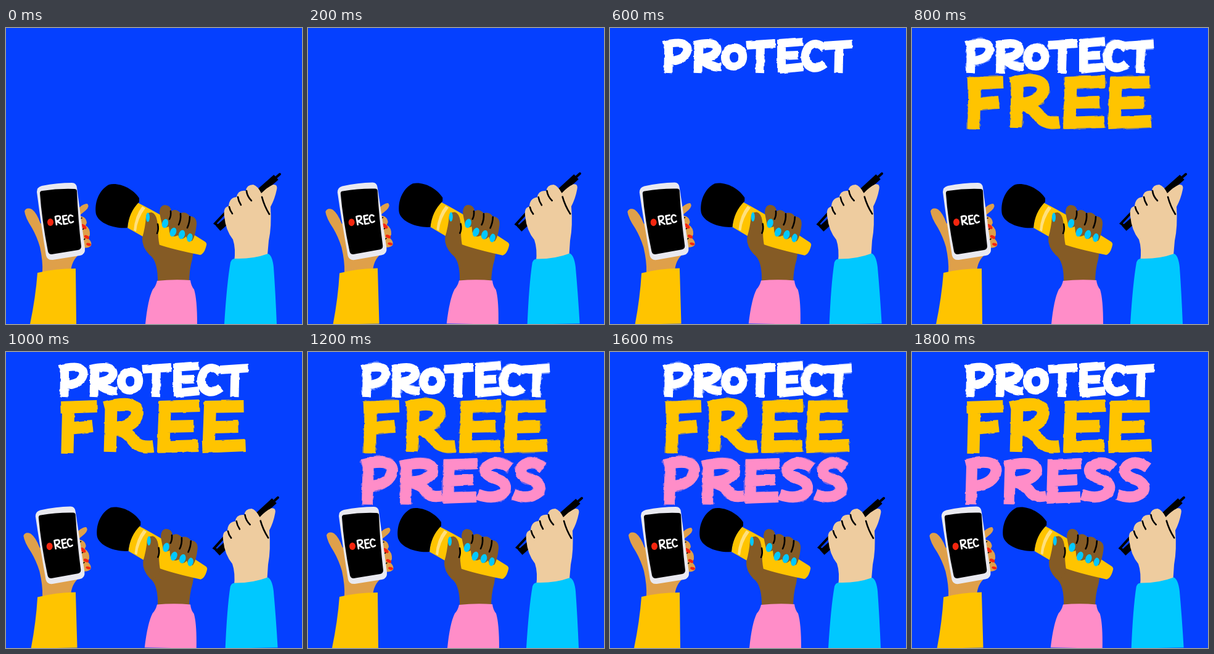
An HTML page for the animation above (2000 ms loop, 480 by 480 pixels).

```html
<!DOCTYPE html>
<html lang="en">
<head>
<meta charset="utf-8">
<title>Protect free press</title>
<style>
  html, body { margin: 0; width: 100%; height: 100%; overflow: hidden; background: #0540ff; }
  svg { display: block; width: 100vw; height: 100vh; }
  .line { fill: none; stroke: #000; stroke-width: 2.6; stroke-linecap: round; }
  .word { fill: none; stroke-linejoin: round; }
  .tan { fill: #dfa04a; }
  .brown { fill: #855b25; }
  .peach { fill: #eecc9f; }
  .nail { fill: #00c8ff; }
  .red { fill: #f5260f; }
</style>
</head>
<body>
<svg viewBox="0 0 480 480">
  <defs>
    <filter id="brush0" color-interpolation-filters="sRGB">
      <feTurbulence type="fractalNoise" baseFrequency=".03 .12" numOctaves="2" seed="4" result="noise"/>
      <feDisplacementMap in="SourceGraphic" in2="noise" scale="3" xChannelSelector="R" yChannelSelector="G" result="paint"/>
      <feDisplacementMap in="SourceGraphic" in2="noise" scale="9" xChannelSelector="B" yChannelSelector="R"/>
      <feComponentTransfer result="fringe"><feFuncA type="linear" slope=".45"/></feComponentTransfer>
      <feMerge><feMergeNode in="fringe"/><feMergeNode in="paint"/></feMerge>
    </filter>
    <filter id="brush1" color-interpolation-filters="sRGB">
      <feTurbulence type="fractalNoise" baseFrequency=".05 .1" numOctaves="2" seed="9" result="noise"/>
      <feDisplacementMap in="SourceGraphic" in2="noise" scale="3" xChannelSelector="R" yChannelSelector="G"/>
    </filter>
  </defs>

  <g id="lettering">
    <g class="word" data-start="2" role="img" aria-label="PROTECT" stroke="#fff" stroke-width="14">
      <path d="M96 21L95 73M87 28Q127 18 126 36Q123 51 99 53
        M144 22L143 73M137 28Q175 19 174 36Q170 47 148 49Q158 63 181 63
        M202 32C220 32 220 62 201 62S183 32 202 32Z
        M221 28L268 25M244 27L243 73
        M278 19V72M274 25L313 22M280 45L305 44M274 67L313 63
        M348 34Q333 19 321 32Q312 47 321 60Q332 70 348 58
        M347 29L392 26M371 27L370 73"/>
    </g>
    <g class="word" data-start="4" role="img" aria-label="FREE" stroke="#ffc400" stroke-width="20">
      <path d="M102 82L100 164M90 90L148 88M103 124L141 120
        M171 84L169 162M160 90Q214 76 213 100Q209 120 178 123Q198 130 207 144Q216 156 239 153
        M258 80L255 163M250 89L313 87M260 121L304 120M246 154L312 152
        M331 81L328 161M322 89L385 88M334 122L376 121M318 154L388 151"/>
    </g>
    <g class="word" data-start="6" role="img" aria-label="PRESS" stroke="#ff8dc8" stroke-width="18">
      <path d="M98 174L96 247M88 183Q137 171 137 193Q133 214 100 218
        M160 177L158 247M150 185Q205 173 202 194Q197 209 164 211Q186 216 192 227Q199 237 218 233
        M229 174L227 244M221 183L275 181M230 209L268 207M219 237L273 235
        M327 188Q306 173 290 186Q282 198 303 205Q326 212 318 227Q303 241 275 231
        M382 188Q362 173 348 185Q338 198 360 206Q381 213 374 227Q358 241 333 231"/>
    </g>
  </g>

  <g data-pivot="80 392" data-tilt="-1">
    <path class="tan" d="M30 297Q33 290 42 294Q50 300 56 317L110 300Q124 284 132 285Q136 290 129 296L118 305
      Q130 305 131 316L129 320Q137 325 136 336L133 341Q140 347 138 353Q132 359 121 355
      L119 367Q106 377 105 396H59Q60 378 55 355Q50 338 42 324Q31 307 30 297Z"/>
    <path class="line" style="stroke-width:1.6" d="M119 310L123 308M121 328L127 325M123 345L128 342"/>
    <g class="red">
      <ellipse cx="126" cy="322" rx="5.5" ry="3" transform="rotate(40 126 322)"/>
      <ellipse cx="131" cy="339" rx="4.5" ry="2.5" transform="rotate(25 131 339)"/>
      <ellipse cx="134" cy="351" rx="4" ry="2.2" transform="rotate(15 134 351)"/>
    </g>
    <path fill="#e9e9f0" d="M58 256Q83 251 107 251Q114 251 115 259L128 357Q129 367 120 369L76 376Q67 377 65 369Q57 320 50 266Q50 258 58 256Z"/>
    <path d="M59 264Q85 260 111 261Q115 261 115 265Q117 312 122 354Q122 359 117 360L74 367Q69 367 68 362Q58 311 55 268Q55 264 59 264Z"/>
    <ellipse class="red" cx="72" cy="315" rx="5" ry="6"/>
    <path role="img" aria-label="REC" fill="none" stroke="#fff" stroke-width="2.7" stroke-linecap="round" stroke-linejoin="round"
      d="M82 319L80 306Q88 303 88 308Q88 312 82 313L90 318M98 304L92 305L94 318L100 317M93 311L98 310M108 305Q102 301 101 309Q103 319 109 314"/>
    <path fill="#ffc400" d="M39 480Q48 437 51 397Q80 390 113 390L114 480Z"/>
  </g>

  <g data-pivot="270 410" data-tilt="1">
    <path class="brown" d="M222 340Q222 357 233 368Q247 378 246 415H297Q297 392 302 375Q307 350 300 330L240 325Z"/>
    <path fill="#ffc400" d="M213 283Q255 304 322 346Q327 348 324 356Q321 366 315 368Q270 359 247 351Q222 339 197 324Q199 299 213 283Z"/>
    <path d="M221 289Q209 304 207 328L211 330Q213 309 226 292Z" fill="#ffe07c"/>
    <path d="M216 276C205 259 182 250 167 254C150 263 143 284 146 302C151 318 178 326 197 324Q199 299 216 282Z"/>
    <path class="brown" d="M249 300Q249 288 257 287Q267 287 268 297Q275 292 283 300Q292 297 298 305Q310 306 309 319Q307 338 302 345Q295 347 292 338Q283 347 279 336Q269 342 265 331L264 322Q256 326 253 319Z"/>
    <path class="line" d="M267 297Q268 304 265 310M283 301Q284 311 280 319M298 306Q298 315 294 324"/>
    <g class="nail">
      <ellipse cx="258" cy="317" rx="5" ry="7.5" transform="rotate(15 258 317)"/>
      <ellipse cx="271" cy="331" rx="5" ry="7.5" transform="rotate(22 271 331)"/>
      <ellipse cx="285" cy="335" rx="5" ry="7.5" transform="rotate(16 285 335)"/>
      <ellipse cx="298" cy="340" rx="4.5" ry="7" transform="rotate(12 298 340)"/>
    </g>
    <path class="brown" d="M227 306Q228 299 236 299Q243 301 245 312L247 325Q246 338 249 353Q244 371 233 368Q220 355 221 340Q226 323 227 306Z"/>
    <path class="line" d="M246 318Q248 327 245 333"/>
    <ellipse class="nail" cx="230" cy="307" rx="3" ry="7.5"/>
    <path fill="#ff8dc8" d="M226 480Q230 440 238 424Q243 419 245 410Q272 407 299 409Q300 418 305 424Q310 440 310 480Z"/>
  </g>

  <g data-pivot="395 395" data-tilt="-1.1">
    <path fill="none" stroke="#000" stroke-width="11" d="M344 325L438 242"/>
    <path fill="none" stroke="#000" stroke-width="4" stroke-linecap="round" d="M436 244L444 237M343 320L339 317L355 300"/>
    <path class="peach" d="M354 305Q352 290 361 289Q362 275 374 274Q376 262 389 264Q390 254 401 254Q408 256 414 268
      Q424 258 433 254Q441 253 439 262Q436 277 429 290Q431 322 426 345L423 380H370Q373 358 368 343Q356 328 354 305Z"/>
    <path class="line" d="M362 290Q363 296 367 301M376 274Q377 281 381 287M390 264Q391 273 398 280M415 274Q419 289 427 302"/>
    <path fill="#00c8ff" d="M354 480Q358 415 364 380Q366 374 371 374Q400 375 425 366Q432 369 434 388Q437 430 439 480Z"/>
  </g>
</svg>
<script>
  const STEP = 200, STEPS = 10;
  const lettering = document.getElementById('lettering');
  const words = document.querySelectorAll('.word');
  const arms = document.querySelectorAll('[data-pivot]');

  function draw(now) {
    const step = Math.floor(now / STEP) % STEPS;
    const pose = step % 2;
    lettering.setAttribute('transform', pose ? 'translate(-1 0) scale(1.004 1)' : '');
    for (const word of words) {
      word.style.display = step >= +word.dataset.start ? '' : 'none';
      word.setAttribute('filter', `url(#brush${pose})`);
    }
    for (const arm of arms) {
      arm.setAttribute('transform', `rotate(${pose * arm.dataset.tilt} ${arm.dataset.pivot})`);
    }
    requestAnimationFrame(draw);
  }
  requestAnimationFrame(draw);
</script>
</body>
</html>
```
